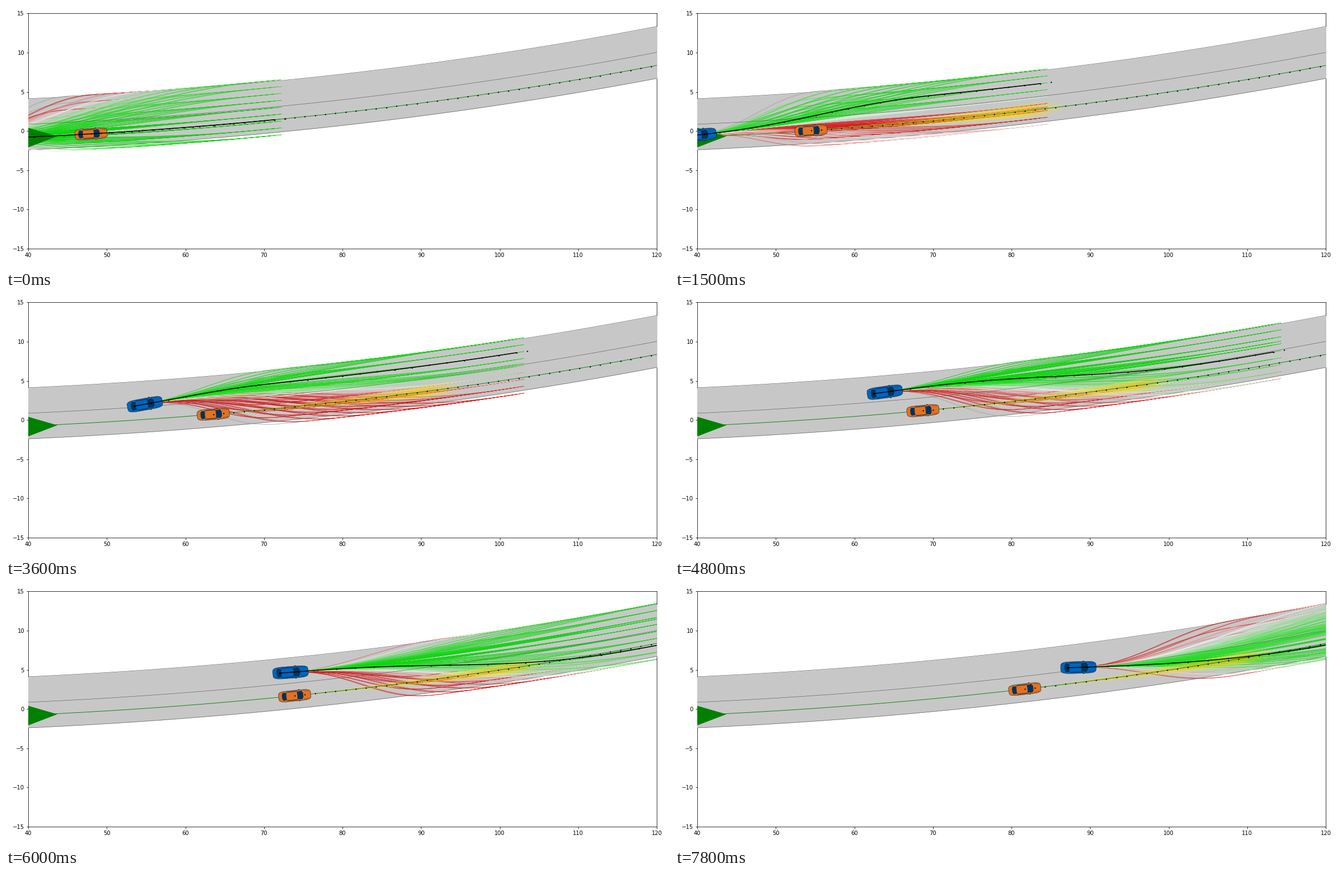
Animation, 1192 px wide and 470 px high, one loop 8000 ms. Source, as a matplotlib script:

```python
import numpy as np
import matplotlib.pyplot as plt
from matplotlib.animation import FuncAnimation
from matplotlib.collections import LineCollection, PolyCollection
from matplotlib.colors import LinearSegmentedColormap
from matplotlib.patches import Polygon
from matplotlib.transforms import Affine2D

W, H, DPI = 1192, 470, 72
LANE = 1.63      # half a lane
STEPS = 22       # planning horizon in time steps
V_OBS = 1.2956   # obstacle advance per step
NAVY = "#003359"
COST_MAP = LinearSegmentedColormap.from_list(
    "cost", ["#00d200", "#35dd35", "#f1f1f1", "#dd4a4a", "#d21414"])

# Planner's lateral motion: position, offset, slope
KNOT_X = np.array([29.2, 32.9, 44.9, 53.5, 62.5, 71.9, 87.2])
KNOT_D = np.array([0, 0, 0.7, 1.78, 2.7, 3.05, 2.04])
KNOT_M = np.array([0, 0, 0.11, 0.114, 0.055, -0.02, -0.097])


def ref(x):
    t = (x - 40) / 10
    return -0.76 + 0.4495 * t + 0.0786 * t**2 + 0.001 * t**3


def ref_slope(x):
    t = (x - 40) / 10
    return (0.4495 + 0.1572 * t + 0.003 * t**2) / 10


def shift(x, d):
    """Height of the curve that runs at distance d from the reference."""
    return ref(x) + d * np.sqrt(1 + ref_slope(x)**2)


def lateral(x):
    i = int(np.clip(np.searchsorted(KNOT_X, x) - 1, 0, len(KNOT_X) - 2))
    h = KNOT_X[i + 1] - KNOT_X[i]
    t = np.clip((x - KNOT_X[i]) / h, 0, 1)
    a, b = KNOT_D[i:i + 2]
    p, q = KNOT_M[i:i + 2] * h
    d = (a * (2*t**3 - 3*t**2 + 1) + p * (t**3 - 2*t**2 + t)
         + b * (3*t**2 - 2*t**3) + q * (t**3 - t**2))
    m = ((a - b) * (6*t**2 - 6*t) + p * (3*t**2 - 4*t + 1)
         + q * (3*t**2 - 2*t)) / h
    return d, m


def quintic(x, d0, m0, d1, span):
    """Lateral offset and its second derivative at distance x."""
    u = np.clip(x / span, 0, 1)
    v, dd = m0 * span, d1 - d0
    d = (d0 + v * u + dd * (10*u**3 - 15*u**4 + 6*u**5)
         - v * (6*u**3 - 8*u**4 + 3*u**5))
    acc = (dd * (60*u - 180*u**2 + 120*u**3)
           - v * (36*u - 96*u**2 + 60*u**3)) / span**2
    return d, acc


def ego_x(k):
    u = k - 8
    return 44.885 + 2.081 * u + 0.01473 * u**2


def obs_x(k):
    return 48.0 + V_OBS * k


def horizon(k):
    return 42.2 + 0.54 * k


SCALES = np.array([0.99, 1.0, 1.02])
WIDTHS = np.array([0.6, 0.6, 0.3])
FRACS = np.linspace(0.4, 1, 8)


def fan(k):
    """Sampled trajectories with their colours and widths, worst first."""
    x0 = ego_x(k)
    d0, m0 = lateral(x0)
    ends = np.append(5 - 0.875 * np.arange(9), d0)
    d1, frac, sc = [g.reshape(-1, 1) for g in
                    np.meshgrid(ends, FRACS, SCALES, indexing="ij")]
    n = np.linspace(0, 1, 36)[None, :]
    run = horizon(k) * sc * n
    d, acc = quintic(run, d0, m0, d1, horizon(k) * sc * frac)
    x = x0 + run
    y = shift(x, d)

    bend = np.abs(acc).max(axis=1) / 0.07
    cost = bend**1.2 * np.interp(k, [0, 2, 17, 20, 26], [1, 0.3, 0.3, 1.8, 1.5])
    if k:  # the first step has no prediction yet
        gap = x + 1.4 - (obs_x(k) + V_OBS * STEPS * n)
        cost += np.exp(-(gap / 7.5)**2 - ((d + 0.3) / 2)**2).max(axis=1)
    cost = np.clip(cost, 0, 1)

    colors = COST_MAP(cost)
    bad = bend > 1
    colors[bad] = (0.62, 0.62, 0.62, 0.6)
    widths = np.tile(WIDTHS, len(cost) // len(WIDTHS))
    order = np.argsort(-(cost + 2 * bad), kind="stable")
    return np.stack([x, y], axis=-1)[order], colors[order], widths[order]


def best(k):
    x0 = ego_x(k)
    d0, m0 = lateral(x0)
    pick = round(float(np.interp(k, [12, 16, 20], [2, 4, 6])))
    end = 0 if k < 2 else 5 - 0.875 * pick
    span = np.interp(k, [2, 8, 12, 16, 20, 26], [39, 30, 21, 47, 48, 40])
    run = np.linspace(0, horizon(k), 2 * STEPS + 1)
    run = np.append(run, run[-1] + 1.35)
    return x0 + run, shift(x0 + run, quintic(run, d0, m0, end, span)[0])


def heat(k, size):
    """Growing ellipses along the obstacle's predicted path."""
    if k < 1:
        return []
    a = np.linspace(0, 2 * np.pi, 40)
    long, wide = np.interp(k, [2, 8], [4.2, 3.0]), np.interp(k, [2, 8], [1.0, 0.85])
    shapes = []
    for n in range(2, STEPS + 1):
        grow = size * (0.06 + 0.94 * n / STEPS)
        x = obs_x(k) + V_OBS * n + long * grow * np.cos(a)
        shapes.append(np.column_stack([x, ref(x) + wide * grow * np.sin(a)]))
    return shapes


fig = plt.figure(figsize=(W / DPI, H / DPI), dpi=DPI, facecolor="white")
ax = fig.add_axes([40 / W, 33 / H, 1130 / W, 423.5 / H])
ax.set(xlim=(40, 120), ylim=(-15, 15))
for spine in ax.spines.values():
    spine.set_zorder(0.5)

xs = np.linspace(38, 122, 200)
ax.fill_between(xs, shift(xs, -LANE), shift(xs, 3 * LANE), color="#c7c7c7",
                lw=0, zorder=1)
for off, z in ((-LANE, 1.5), (3 * LANE, 1.5), (LANE, 4)):
    ax.plot(xs, shift(xs, off), color="#555555", lw=0.6, zorder=z)
ax.plot(xs, ref(xs), color="green", lw=0.9, zorder=5)
ax.add_patch(Polygon([(40, 0.42), (43.7, -0.66), (40, -2.08)],
                     fc="green", lw=0, zorder=5))

rays = LineCollection([], zorder=2)
glow = PolyCollection([], facecolors=(0.97, 0.9, 0.1, 0.16), lw=0, zorder=3)
core = PolyCollection([], facecolors=(1.0, 0.62, 0.0, 0.17), lw=0, zorder=3.1)
for c in (rays, glow, core):
    ax.add_collection(c, autolim=False)
obs_dots, = ax.plot([], [], "ko", ms=2.3, mew=0, zorder=8)
plan, = ax.plot([], [], "k-", lw=1.5, zorder=8)
plan_dots, = ax.plot([], [], "ko", ms=2.4, mew=0, zorder=8)


def mirrored(points):
    return points + [(x, -y) for x, y in reversed(points)]


def make_car(color):
    a = np.linspace(0, 2 * np.pi, 80)
    c, s = np.cos(a), np.sin(a)
    body = np.column_stack([2.25 * np.sign(c) * np.abs(c)**0.42,
                            0.75 * np.sign(s) * np.abs(s)**0.42])
    parts = []

    def part(points, fc, lw=0.0):
        p = Polygon(points, fc=fc, ec="#1c1c1c", lw=lw, zorder=7)
        parts.append(ax.add_patch(p))

    for side in (1, -1):
        part([(0.52, side * 0.7), (0.6, side * 0.84), (0.72, side * 0.82),
              (0.76, side * 0.7)], NAVY, 0.2)
    part(body, color, 0.6)
    part(mirrored([(-1.78, 0.25), (-1.62, 0.57), (-1.1, 0.5), (-1.16, 0.25)]), NAVY)
    part(mirrored([(0.38, 0.25), (0.33, 0.5), (1.0, 0.62), (1.2, 0.3)]), NAVY)
    for side in (1, -1):
        part([(-1.2, side * 0.64), (0.65, side * 0.64), (0.3, side * 0.55),
              (-1.0, side * 0.55)], NAVY)
        part([(1.25, side * 0.6), (2.05, side * 0.46), (2.05, side * 0.49),
              (1.25, side * 0.63)], NAVY)
    return parts


def place(car, x, y, slope, size=1.0):
    pose = Affine2D().scale(size).rotate(np.arctan(slope)).translate(x, y)
    for p in car:
        p.set_transform(pose + ax.transData)


other = make_car("#e37222")
ego = make_car("#0065bd")


def update(i):
    k = i // 3
    segs, colors, widths = fan(k)
    rays.set_segments(segs)
    rays.set_color(colors)
    rays.set_linewidth(widths)
    glow.set_verts(heat(k, 1))
    core.set_verts(heat(k, 0.5))

    xo = obs_x(k)
    dots = xo + V_OBS * np.arange(60)
    obs_dots.set_data(dots, ref(dots))
    place(other, xo, ref(xo), ref_slope(xo), 0.91)

    px, py = best(k)
    plan.set_data(px[:-1], py[:-1])
    plan_dots.set_data(np.append(px[:-1:2], px[-1]), np.append(py[:-1:2], py[-1]))
    x0 = ego_x(k)
    d, m = lateral(x0)
    slope = ref_slope(x0) + m
    place(ego, x0 + 1.4, shift(x0, d) + 1.4 * slope, slope)
    return [rays, glow, core, obs_dots, plan, plan_dots, *other, *ego]


anim = FuncAnimation(fig, update, frames=80, interval=100, repeat=True,
                     repeat_delay=0, blit=False)
plt.show()
```
